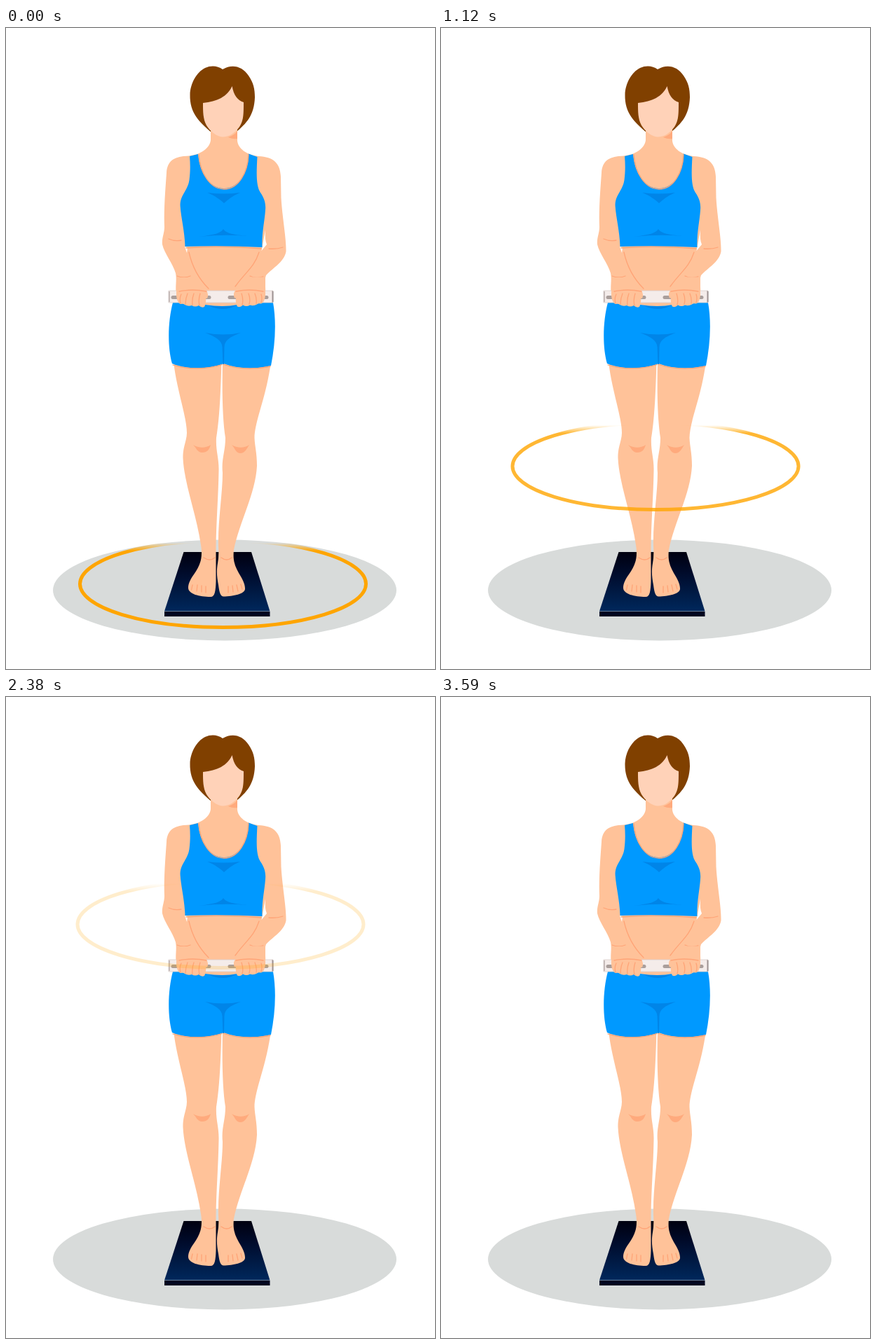
Animation of 612 by 915 pixels, one loop 4090 ms. Source, as an HTML page:

```html
<!DOCTYPE html>
<html lang="en">
<head>
<meta charset="utf-8">
<title>Body scan</title>
<style>
  html, body { margin: 0; width: 100%; height: 100%; overflow: hidden; background: #fff; }
  svg { display: block; width: 612px; height: 915px; }
  .skin { fill: #ffc299; }
  .blue { fill: #09f; }
  .fold { fill: #0085e8; }
  .line { fill: none; stroke: #ffa477; stroke-width: 1.3; stroke-linecap: round; }
  .crease { fill: #ffaa7d; }
</style>
</head>
<body>
<svg viewBox="0 0 612 915">
  <defs>
    <linearGradient id="glass" x2="0" y2="1">
      <stop stop-color="#00000f"/><stop offset=".35" stop-color="#000b2b"/><stop offset="1" stop-color="#00285c"/>
    </linearGradient>
    <linearGradient id="fade" gradientUnits="userSpaceOnUse" x1="0" y1="-58.5" x2="0" y2="-47">
      <stop stop-color="#ffa500" stop-opacity="0"/><stop offset="1" stop-color="#ffa500"/>
    </linearGradient>
  </defs>

  <ellipse cx="312" cy="802.5" rx="245" ry="72" fill="#d8dbda"/>
  <path d="M253.500 748H350L376.500 832.500H226Z" fill="url(#glass)"/>
  <path d="M226 833H376.500V840H226Z" fill="#00051f"/>

  <!-- legs and feet -->
  <g class="skin">
    <path d="M239 476C243 515 258 555 258 578C258 589 252 598 252.500 614C254 650 272 695 278 738C281 757 277 767 268 780C263 787 260 793 260 799C260 808 276 812 292 812C298 812 299 804 299.500 790L299.500 740C300 705 303 665 303.500 632C304 614 299 604 300 585C304 560 306 530 307.500 476Z"/>
    <path d="M378 476C372 525 355 560 354.500 585C355 598 358 606 358 625C356 665 333 705 325 745C323 763 328 771 335 783C339 790 341 795 341 801C340 808 325 811 310 811.500C305 811 304 802 303 795C301 784 300 776 302 764Q304 755 303 740C302 705 309 665 309 635C307 615 313 605 313 585C309 560 308 520 309 476Z"/>
  </g>
  <path class="crease" d="M267 595C275 600 285 600 292 595C290 602 287 606 280 606C273 606 272 600 267 595ZM322 595C330 600 340 600 347 595C343 601 341 607 334 607C327 606 327 600 322 595Z"/>
  <path class="line" d="M282 756Q291 762 298 756M307 756Q315 762 322 756M266 795L264.500 802M273 795L272 804M279 796V805M285 797V806M317 797V806M323 796L324 805M329 795L331 804M335 794L337 801"/>

  <!-- torso and arms -->
  <path class="skin" d="M292 145V160C291 171 278 181 261 182.500C242 183 230 188 229 207C227 235 225 260 226 284C226 293 222 300 223 309C226 322 238 336 242 350C244 360 241 368 243 382L260 398H360L370 380C371 368 368 362 371 353C381 342 397 334 399.500 319C400 300 394 270 392.500 242L392 212C391 193 382 184 360 183C343 181 331 172 330 161V145Z"/>
  <path fill="#fff" d="M255 312L259 313L258 321ZM370 288Q369 303 372 309L364.500 318Z"/>
  <path class="crease" d="M318 156Q326 154 330 147V158Q324 159 318 156Z"/>
  <path class="blue" d="M238 392H381C386 420 384 452 378 482C357 487 332 487 310.500 479C289 487 260 488 237 479C230 455 231 418 238 392Z"/>
  <path class="line" d="M238 481C260 488 289 487 308 480.500M311 480.500C332 487.500 357 487.500 377 483"/>
  <path class="fold" d="M284 435Q310 440 335 435C319 441 312 446 311.500 455L311 480H309.500L308.500 455C308 446 298 440 284 435ZM288 396Q309 399 329 396Q310 406 288 396Z"/>
  <path class="skin" d="M284 390H330V395Q310 399 284 395Z"/>
  <path class="line" d="M257 314Q310 310 364 315" stroke-width="2"/>
  <path class="blue" d="M262 183L274 180C276 206 290 229 311 229C332 229 346 206 346 179.500L358.500 184C357 210 357 226 363 235C368 242 371 250 370 260C369 276 365 290 365.500 313Q310 310 255.500 312C255 290 249 268 248.500 252C249 237 259 233 261.500 217C263 205 263 195 262 183Z"/>
  <path class="line" stroke-width="1" d="M275 181C277 207 291 230 311 230C332 230 345 206 346 181"/>
  <path class="fold" d="M287 235Q311 238 334 235C322 240 317 245 311 250C304 244 299 240 287 235ZM275 298C298 295 306 293 310 287C314 293 323 295 345 297Q311 294 275 298Z"/>
  <path class="line" d="M232 301Q241 305 250 303M375 315Q386 316 395 313M261 320C266 343 276 359 289 372M361 320C354 342 342 348 327 369M244 354Q253 358 263 354M348 354Q356 358 367 355"/>

  <!-- handle and fingers -->
  <path d="M232 375H381V392H232Z" fill="#f4ecea" stroke="#d8cdca" stroke-width=".8"/>
  <path d="M379.500 375L381.500 376V391L379.500 392Z" fill="#9d9292"/>
  <path d="M233 376V391" stroke="#b9adab" stroke-width="1.500"/>
  <path d="M238 384.500H290M319 384.500H372" stroke="#a99e9b" stroke-width="5" stroke-linecap="round"/>
  <path class="skin" id="hand" d="M243 356L243 382Q244 392 249 394Q253 393 255 395Q260 398 265 396Q270 399 275 396Q279 400 283 398Q286 392 285 386L287 386Q290 379 285 374L268 356Z"/>
  <use href="#hand" transform="matrix(-1 0 0 1 613 -.5)"/>
  <path class="line" d="M250 380Q247 386 249 393M259 379Q256 386 256 394M268 379Q265 387 266 395M277 379Q274 388 276 396M247 376Q266 372 286 376M336 379Q339 388 337 395M346 379Q349 387 347 394M355 379Q358 386 357 393M364 380Q366 386 364 392M328 376Q347 372 367 376"/>

  <!-- head -->
  <path fill="#804000" d="M309 59C322 51 337 54 346 68C353 78 355 87 355 99C354 125 343 136 328 149H293C276 134 262 122 262.500 95C263 79 272 63 284 57C293 53 302 54 309 59Z"/>
  <path class="skin" d="M292 145H330V165H292Z"/>
  <path class="crease" d="M317 156Q326 153 330 147V158Q324 159 317 156Z"/>
  <path fill="#ffd2b8" d="M281 107C301 105 316 98 322.500 83C325 96 330 103 339 106C339 125 339 135 330 145C323 152 317 155.500 309 155.500C300 155 291 147 286 139C281 130 281 119 281 107Z"/>

  <ellipse id="ring" rx="204" ry="62" fill="none" stroke="url(#fade)" stroke-width="5"/>
</svg>
<script>
  const LOOP = 4090, START = 30, PERIOD = 470, STEP = 30;
  const heights = [793.5, 716.5, 625.5, 528.5, 424.5, 324.5, 224.5, 125.5];
  const ring = document.getElementById('ring');

  // Each ring rises to full strength in five steps and falls in five.
  function pulse(step) {
    return Math.max(0, 1 - Math.abs(step - 4) / 5);
  }

  function draw(now) {
    const t = now % LOOP, since = t - START;
    const index = Math.max(0, Math.floor(since / PERIOD));
    const shown = index < heights.length;
    const alpha = since < 0 ? 1 : shown ? pulse(Math.floor(since % PERIOD / STEP)) : 0;
    if (shown) ring.setAttribute('transform', `translate(${index ? 306 : 309.5} ${heights[index]})`);
    ring.setAttribute('opacity', alpha);
    requestAnimationFrame(() => draw(performance.now() - origin));
  }

  const origin = performance.now();
  draw(0);
</script>
</body>
</html>
```
